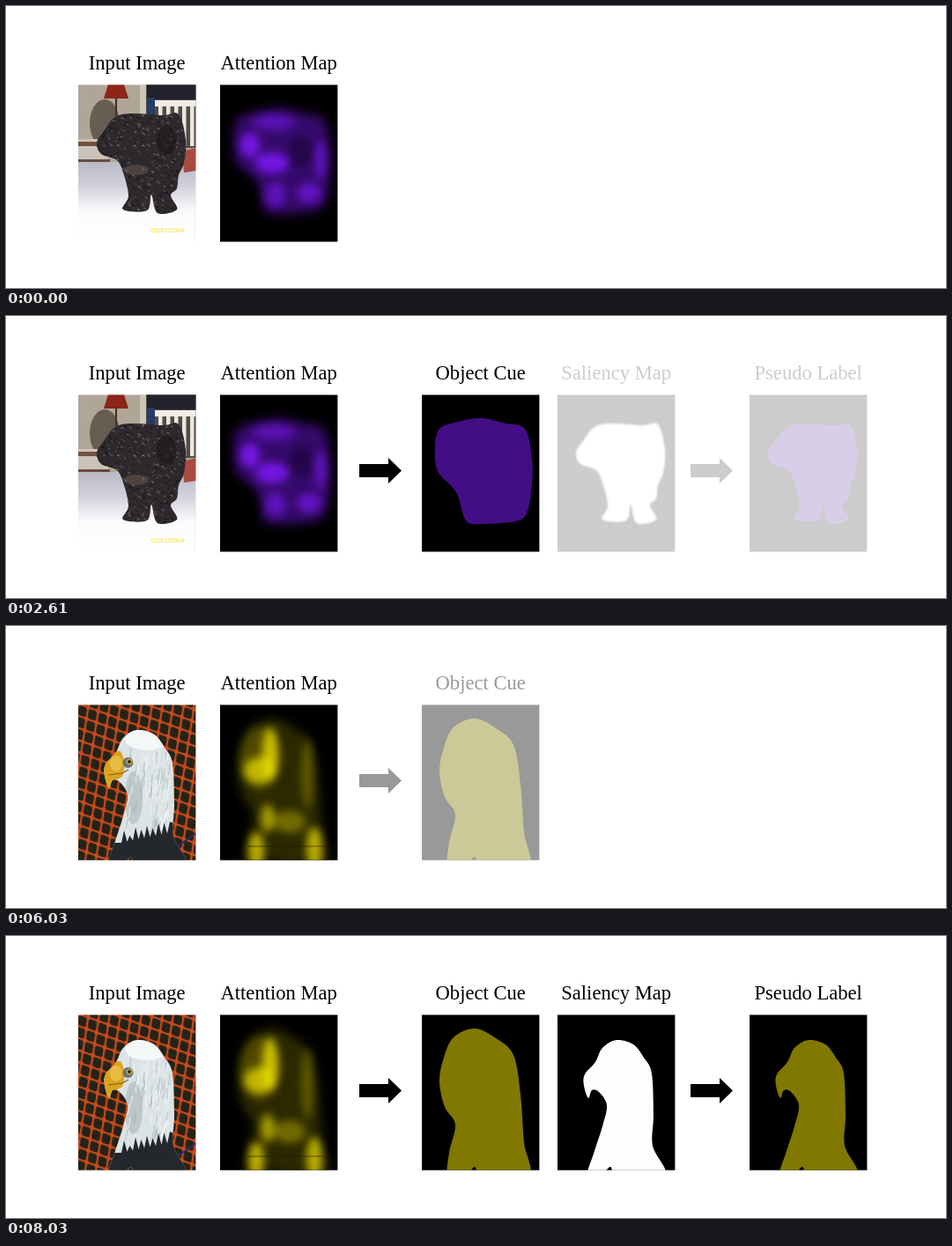
These frames come from a looping animation (1067x320 px, 8.06 s). An HTML page:

```html
<!DOCTYPE html>
<html lang="en">
<head>
<meta charset="utf-8">
<title>From attention map to pseudo label</title>
<style>
  html, body { margin: 0; width: 100%; height: 100%; overflow: hidden; background: #fff; }
  #stage { display: block; width: 1067px; height: 320px; }
  .title { font: 22.6px "Liberation Serif", "Times New Roman", serif; text-anchor: middle; }
  .date { font: 7.4px "Liberation Sans", Arial, sans-serif; fill: #f2e21c; }
</style>
</head>
<body>
<svg id="stage" viewBox="0 0 1067 320"></svg>
<script>
const LOOP = 8060, CUT = 3900, FADE = 500;
const TOP = 89.4, WIDTH = 133.4;
const INPUT = 82, ATTENTION = 243, CUE = 472, SALIENCY = 626, LABEL = 844;

// Closed Catmull-Rom curve through "x,y" key points.
function smooth(text) {
  const pts = text.trim().split(/\s+/).map(p => p.split(',').map(Number));
  const at = i => pts[(i + pts.length) % pts.length];
  const ctrl = (p, a, b) => p.map((v, k) => (v + (b[k] - a[k]) / 6).toFixed(1));
  return 'M' + pts[0] + pts.map((p, i) => {
    const next = at(i + 1);
    return `C${ctrl(p, at(i - 1), next)} ${ctrl(next, at(i + 2), p)} ${next}`;
  }).join('') + 'Z';
}

function seeded(seed) {
  const next = () => (seed = (seed * 16807) % 2147483647) / 2147483647;
  return (low, high) => low + (high - low) * next();
}
const repeat = (count, draw) => Array.from({ length: count }, (_, i) => draw(i)).join('');

const shapes = {
  dogCue: smooth(`487,148 492,128 509,121 539,116 568,122 589,128 597,160 597,190
    593,218 582,232 540,236 522,232 511,200 490,176`),
  dog: smooth(`647,155 655,142 668,126 688,122 722,124 740,123 748,152 746,178 740,192 738,207
    731,215 738,231 716,235 709,214 704,232 677,231 683,216 678,192 670,175 652,168`),
  eagleCue: smooth(`532,105 508,115 497,138 492,165 498,194 510,214 503,246 502,272
    523,270 532,262 541,270 593,272 588,234 584,180 576,135 556,116`),
  eagle: smooth(`693,118 677,127 669,143 657,157 656,170 661,184 665,175 673,177 682,192 677,216
    668,244 660,272 677,270 686,262 695,270 748,272 734,238 735,203 733,156 724,138 712,123`)
};

const rect = (x, y, w, h, fill) => `<rect x="${x}" y="${y}" width="${w}" height="${h}" fill="${fill}"/>`;
const path = (d, fill, extra = '') => `<path d="${d}" fill="${fill}" ${extra}/>`;
const line = (d, color, width = 1) => path(d, 'none', `stroke="${color}" stroke-width="${width}"`);
const oval = (cx, cy, rx, ry, fill, opacity = 1) =>
  `<ellipse cx="${cx}" cy="${cy}" rx="${rx}" ry="${ry}" fill="${fill}" opacity="${opacity}"/>`;
const title = (x, text) => `<text class="title" x="${x + WIDTH / 2}" y="72">${text}</text>`;
const arrow = x => path(`M${x} 168h33v-7l15 14.5-15 14.5v-7h-33z`, '#000');
const moved = (from, to, body) => `<g transform="translate(${to - from} 0)">${body}</g>`;

// A clipped panel whose content keeps the coordinates of panel `from`.
const panel = (x, height, body, from = x) =>
  `<svg x="${x}" y="${TOP}" width="${WIDTH}" height="${height}"
    viewBox="${from} ${TOP} ${WIDTH} ${height}">${body}</svg>`;
const backdrop = (x, fill) => rect(x, 89, 134, 179, fill);
const mask = (x, height, shape, fill, from, extra) =>
  panel(x, height, backdrop(from, '#000') + path(shape, fill, extra), from);

function dogPhoto() {
  const rnd = seeded(41);
  const fur = repeat(650, () => {
    const r = rnd(.6, 1.8), shade = 15 + 120 * rnd(0, 1) ** 2;
    return line(`M${rnd(102, 206)} ${rnd(119, 237)}q${r} ${-r * 1.6} ${r * 2} ${rnd(0, 2)}`,
      `rgb(${shade + 4} ${shade} ${shade + 2})`);
  });
  return rect(82, 89, 134, 90, '#b0a698') + rect(152, 89, 7, 40, '#cfc5b5') +
    rect(159, 89, 57, 72, '#514b4a') + rect(160, 89, 56, 17, '#22222c') + rect(160, 104, 9, 22, '#263c68') +
    `<g filter="url(#fine)">${oval(112, 133, 17, 27, '#493f36', .7)}</g>` +
    path('M116 89h18l5 16h-28z', '#8b2619') + rect(124, 105, 2, 20, '#4b2b1e') +
    rect(169, 107, 47, 7, '#f2ede4') + repeat(5, i => rect(173 + i * 9, 113, 4.5, 46, '#ece6dc')) +
    rect(82, 151, 34, 26, '#cbc3b9') + rect(82, 154, 34, 5, '#74513f') + rect(82, 174, 36, 3, '#6d4a3a') +
    rect(82, 177, 134, 91, 'url(#floor)') + path('M200 165l16-4v26l-14 2z', '#a84c42') +
    line('M215.1 187V268', '#d4d4d8', .6) +
    `<g clip-path="url(#dogClip)">${backdrop(INPUT, '#2e292c')}${fur}
      ${oval(148, 186, 14, 6, '#8a7063', .35)}${oval(182, 153, 11, 17, '#120f13', .4)}</g>
    <text class="date" x="165" y="257">01/01/2004</text>`;
}

// A dim blurred silhouette with brighter patches glowing inside it.
const attention = (shape, dim, patches) => backdrop(ATTENTION, '#000') +
  `<g filter="url(#soft)">${moved(CUE, ATTENTION, path(shape, dim))}</g><g filter="url(#glow)">${patches}</g>`;

function dogAttention() {
  const hot = '#7a18ee';
  return attention(shapes.dogCue, '#360a6c',
    oval(277, 158, 11, 14, hot, .9) + oval(302, 178, 19, 12, hot, .9) + oval(304, 132, 24, 9, hot, .55) +
    oval(357, 175, 6, 22, hot, .65) + oval(306, 214, 11, 14, hot, .6) + oval(344, 212, 14, 11, hot, .65) +
    oval(335, 165, 13, 18, '#170330', .6) + oval(268, 212, 18, 20, '#000', .8));
}

function eaglePhoto() {
  const rnd = seeded(7);
  const feathers = repeat(90, () => line(
    `M${rnd(138, 186)} ${rnd(138, 226)}q0 7 ${rnd(-4, 0)} 12`, rnd(0, 1) < .5 ? '#a9b5b9' : '#f5f9fa', .8));
  const tips = repeat(9, i => `L${131 + i * 6.5} ${246 - i * 1.3}l3 ${-rnd(6, 16)}`);
  const bird = backdrop(INPUT, '#dce3e5') + oval(160, 128, 25, 13, '#f5f8f8') +
    `<g filter="url(#fine)">${oval(145, 195, 10, 30, '#a9b6ba', .6)}</g>` + feathers +
    path(`M82 268V246${tips}L216 230V268z`, '#24272b') +
    path('M82 142h48q8 14 2 29l-9 5-5 12H82z', '#d9a520') + oval(125, 156, 7, 9, '#efc24a', .8) +
    line('M116 169l16-2 7-4', '#876013', 1.2) +
    oval(138.5, 155, 6, 6, '#66727a') + oval(140, 154, 3.5, 3.5, '#cba629') + oval(140, 154, 1.8, 1.8, '#101010');
  return backdrop(INPUT, 'url(#mesh)') + line('M193 251l23-16', '#29297b', 2) +
    `<g clip-path="url(#eagleClip)">${bird}</g>`;
}

function eagleAttention() {
  const hot = '#f2e400';
  return attention(shapes.eagleCue, '#2c2900',
    oval(288, 150, 24, 36, hot, .18) + oval(300, 145, 9, 30, hot, .75) + oval(288, 164, 18, 15, hot, .7) +
    oval(342, 168, 7, 40, hot, .25) + oval(297, 218, 8, 16, hot, .6) + oval(284, 254, 9, 20, hot, .7) +
    oval(350, 252, 9, 24, hot, .7) + oval(322, 222, 18, 13, hot, .35)) +
    line('M274 250h88', '#1c1a00', .6);
}

function slide(name, height, photo, heat, color, edge) {
  const shape = shapes[name];
  return `<g id="${name}">
    ${title(INPUT, 'Input Image')}${panel(INPUT, height, photo)}
    ${title(ATTENTION, 'Attention Map')}${panel(ATTENTION, height, heat)}
    <g id="${name}-cue">${arrow(401)}${title(CUE, 'Object Cue')}
      ${mask(CUE, height, shapes[name + 'Cue'], color, CUE)}</g>
    <g id="${name}-result">${title(SALIENCY, 'Saliency Map')}${arrow(777)}${title(LABEL, 'Pseudo Label')}
      ${mask(SALIENCY, height, shape, '#fdfdfd', SALIENCY, `filter="url(#${edge})"`)}
      ${mask(LABEL, height, shape, color, SALIENCY)}</g>
  </g>`;
}

const blur = (id, amount) => `<filter id="${id}" x="-60%" y="-60%" width="220%" height="220%"
  color-interpolation-filters="sRGB"><feGaussianBlur stdDeviation="${amount}"/></filter>`;
const birdClip = name => `<clipPath id="${name}Clip">
  <path d="${shapes[name]}" transform="translate(${INPUT - SALIENCY} 0)"/></clipPath>`;

document.getElementById('stage').innerHTML = `<defs>
  ${blur('soft', 6)}${blur('glow', 5)}${blur('edge', .8)}${blur('fine', .5)}
  ${birdClip('dog')}${birdClip('eagle')}
  <linearGradient id="floor" x2="0" y2="1">
    <stop stop-color="#b9b9c7"/><stop offset=".3" stop-color="#d1d1dc"/>
    <stop offset=".62" stop-color="#fbfbfd"/><stop offset="1" stop-color="#fff"/>
  </linearGradient>
  <pattern id="mesh" width="12" height="13" patternUnits="userSpaceOnUse"
    patternTransform="translate(82 88) skewX(-9) skewY(19)">
    ${rect(0, 0, 12, 13, '#c94a1a')}<rect x="1.2" y="1.2" width="9.8" height="10.8" rx="2.5" fill="#252318"/>
  </pattern>
  </defs>` +
  slide('dog', 178, dogPhoto(), dogAttention(), '#430d85', 'edge') +
  slide('eagle', 176.3, eaglePhoto(), eagleAttention(), '#807800', 'fine');

// Each step is [time in ms, opacity].
function track(id, steps) {
  document.getElementById(id).animate(
    steps.map(([time, opacity]) => ({ offset: time / LOOP, opacity })),
    { duration: LOOP, iterations: Infinity });
}
const fadeIn = (id, start) => track(id, [[0, 0], [start, 0], [start + FADE, 1], [LOOP, 1]]);

track('dog', [[0, 1], [CUT, 1], [CUT, 0], [LOOP, 0]]);
track('eagle', [[0, 0], [CUT, 0], [CUT, 1], [LOOP, 1]]);
fadeIn('dog-cue', 1027);
fadeIn('dog-result', 2510);
fadeIn('eagle-cue', 5830);
fadeIn('eagle-result', 7467);
</script>
</body>
</html>
```
